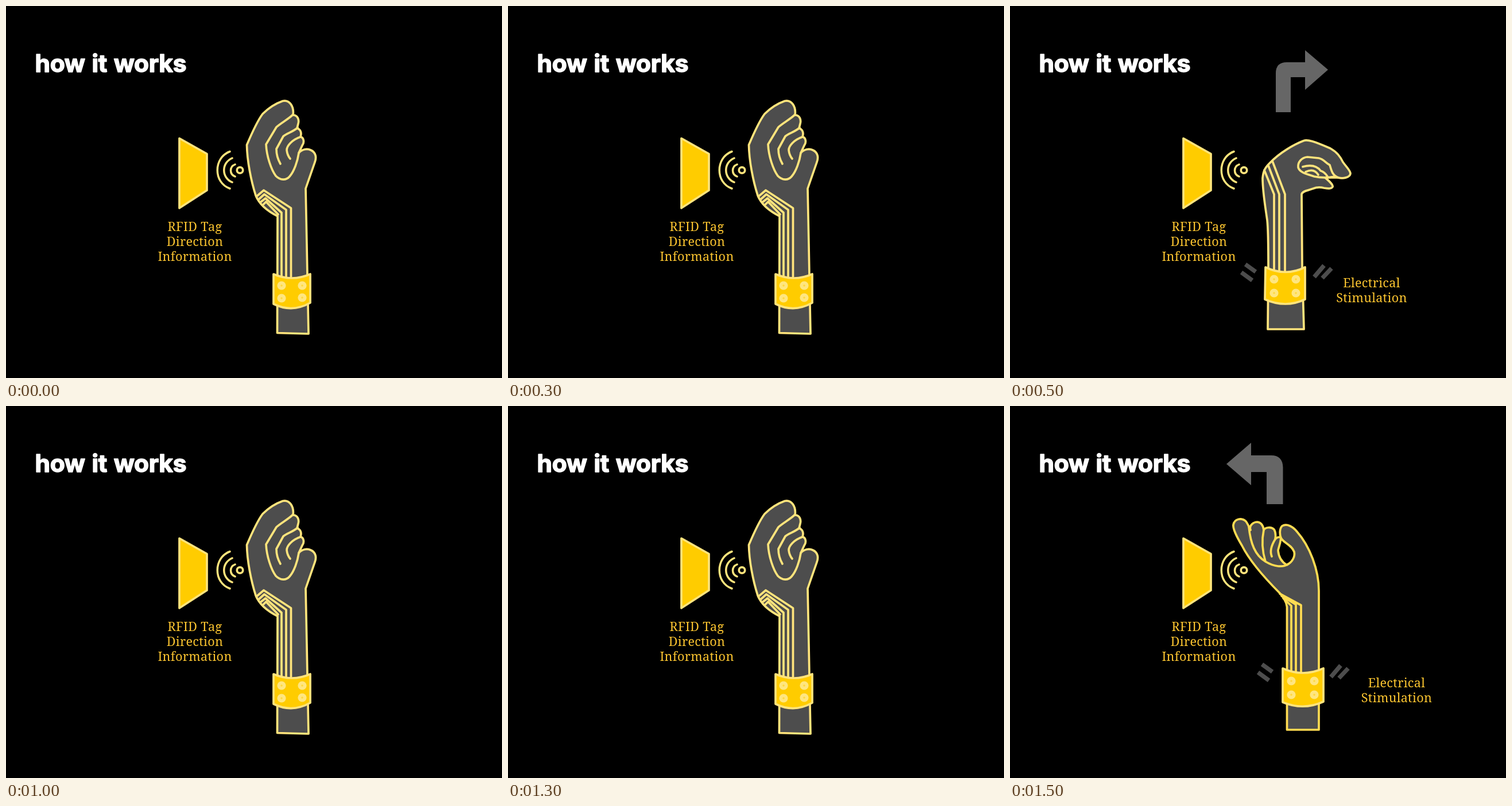
An HTML page for the animation above (2000 ms loop, 864 px wide and 648 px high).

```html
<!DOCTYPE html>
<html lang="en">
<head>
<meta charset="utf-8">
<title>How it works</title>
<style>
  html, body { margin: 0; width: 100%; height: 100%; overflow: hidden; background: #000; }
  svg { display: block; width: 864px; height: 648px; }

  .title {
    font: 700 42.5px Inter, sans-serif; letter-spacing: -.3px; word-spacing: 2px;
    fill: #fff; stroke: #fff; stroke-width: 1.6; stroke-linejoin: round;
  }
  .label { font: 21.6px "Noto Serif", serif; letter-spacing: .3px; fill: #fcc530; text-anchor: middle; }

  .pose { --line: #ffe47c; fill: none; stroke: var(--line); stroke-width: 3.7; stroke-linecap: round; stroke-linejoin: round; }
  .deep { --line: #ffdc52; }
  .skin { fill: #4d4d4d; }
  .gold { fill: #fc0; stroke: #ffe47c; }
  .gap { fill: #000; }
  .arrow { fill: #666; }
  .sparks { fill: none; stroke: #4d4d4d; stroke-width: 7.4; }

  .rest, .right, .left { animation: 2s step-end infinite; }
  .rest { animation-name: rest; }
  .right { animation-name: right; }
  .left { animation-name: left; }
  @keyframes rest { 0%, 50% { opacity: 1; } 25%, 75%, 100% { opacity: 0; } }
  @keyframes right { 0%, 50%, 100% { opacity: 0; } 25% { opacity: 1; } }
  @keyframes left { 0%, 100% { opacity: 0; } 75% { opacity: 1; } }
</style>
</head>
<body>
<svg viewBox="0 0 864 648">
  <defs>
    <g id="stud" stroke="none">
      <circle r="7.6" fill="#ffe680"/>
      <circle r="1.8" fill="#ffd83f"/>
    </g>
    <path id="sparks" class="sparks" d="M410 450L428 463M403 464L422 478M530 472L547 452M544 474L560 457"/>
    <g id="stimulation" class="label">
      <text x="630" y="490">Electrical</text>
      <text x="630" y="516">Stimulation</text>
    </g>
  </defs>

  <text class="title" x="50.500" y="115">how it works</text>

  <g class="pose">
    <path class="gold" d="M302 230.500L350 257.500V321L302 352Z"/>
    <circle cx="407.500" cy="286" r="5.200"/>
    <path d="M390 253.500C361 264 361 308 390 318M394 265C375 273 375 299 394 307M399 276C389 280 389 293 399 297" stroke-width="3.500"/>
  </g>
  <g class="label">
    <text x="329" y="392">RFID Tag</text>
    <text x="329" y="418">Direction</text>
    <text x="329" y="444">Information</text>
  </g>

  <g class="rest">
    <g class="pose">
      <path class="skin" d="M472.500 569.500L473 366C455 357 441 345 435 330C427 305 420 270 419.500 242C428 222 438 200 447 188C458 177 472 169 482 165.500C494 163 502 175 500 190C508 190 511 198 509 205L507 213C514 215 515 222 513 228C519 229 520 238 516 243L510 256C516 249 525 248 531 251C540 255 541 264 538 272L522 318C523 360 524 420 525 470L527 571Z"/>
      <path d="M500 189C495 195 477 205 471 211L453 241C454 262 462 285 470 296C478 304 488 304 494 297C502 288 508 270 510 256"/>
      <path d="M508 212C500 219 489 222 483 227L471 249C471 260 474 268 478 275M513 228C498 233 489 244 489 251Q490 260 495 266"/>
      <path d="M436 332L449 321L496.500 352V472M440 337L450 328L488 355V472M443 342L452 335L480 360V472M447 347L453 341L474 363"/>
      <path class="gold" d="M466 467Q498 481 530 467V517Q498 535 466 519Z"/>
      <use href="#stud" x="480" y="487"/>
      <use href="#stud" x="516" y="487"/>
      <use href="#stud" x="480" y="509"/>
      <use href="#stud" x="516" y="508"/>
    </g>
  </g>

  <g class="right">
    <path class="arrow" d="M463 185V117Q463 98 482 98H514V77L554 111L514 146V124H489V185Z"/>
    <use href="#sparks"/>
    <use href="#stimulation"/>
    <g class="pose">
      <path class="skin" d="M449 563L450 455C450 410 450 390 448 373C444 345 440 322 440 300C441 288 444 282 452 274C470 255 495 241 512 234.500C518 232 530 236 558 248C570 255 575 262 580 272C588 283 593 287 593 292C592 299 580 301 572 299L549 299C556 305 563 311 562 315C560 319 553 318 547 317C540 315 535 315 528 318C518 322 509 322 508 328L509 455L512 563Z"/>
      <path d="M572 299C561 295 560 286 557 277C549 273 547 267 538 265L518 263C508 264 501 272 502 281C504 290 518 293 530 297C545 300 556 299 566 297"/>
      <path d="M510 280C525 276 535 279 541 287Q548 289 553 297M515 289C525 284 532 286 537 294"/>
      <path d="M443 286L460 328V461M450 278L469 328V462M457 270L479 328V462"/>
      <path class="gold" d="M445 455Q480 472 514 455V511Q480 527 444 511Z"/>
      <use href="#stud" x="460" y="476"/>
      <use href="#stud" x="498" y="476"/>
      <use href="#stud" x="460" y="500"/>
      <use href="#stud" x="498" y="500"/>
    </g>
  </g>

  <g class="left">
    <path class="arrow" d="M475.500 171V107Q475 86 455 86H420V64L377 101L420 138V115H447V171Z"/>
    <use href="#sparks" x="29"/>
    <use href="#stimulation" x="43.500"/>
    <g class="pose deep">
      <path class="skin" d="M482.500 564V350C481 339 475 332 470 326C440 296 415 265 404 243C395 228 388 215 389 207C391 196 404 194 411 201C414 205 416 210 419 216C416 208 424 202 431 202C438 203 441 208 442 216C445 211 455 210 460 215C463 220 463 226 462 232C464 229 469 227 472 230C469 222 470 213 474 209C482 204 493 210 500 219C522 244 538 285 538 322V564Z"/>
      <path class="gap" d="M472 230C470 245 467 248 467 252C468 264 474 272 482 277C492 272 497 262 495 254C490 241 477 239 472 230Z"/>
      <path d="M416 210C419 240 427 260 445 271C460 280 475 282 485 275M442 216C438 235 440 255 445 271M462 232C454 245 453 255 456 262"/>
      <path d="M470 327L507 347V463M473 331L498 346V463M476 335L490 348V463"/>
      <path class="gold" d="M475 457Q510 473 546 457V515Q511 531 475 516Z"/>
      <use href="#stud" x="490" y="479"/>
      <use href="#stud" x="530" y="479"/>
      <use href="#stud" x="490" y="503"/>
      <use href="#stud" x="530" y="503"/>
    </g>
  </g>
</svg>
</body>
</html>
```
